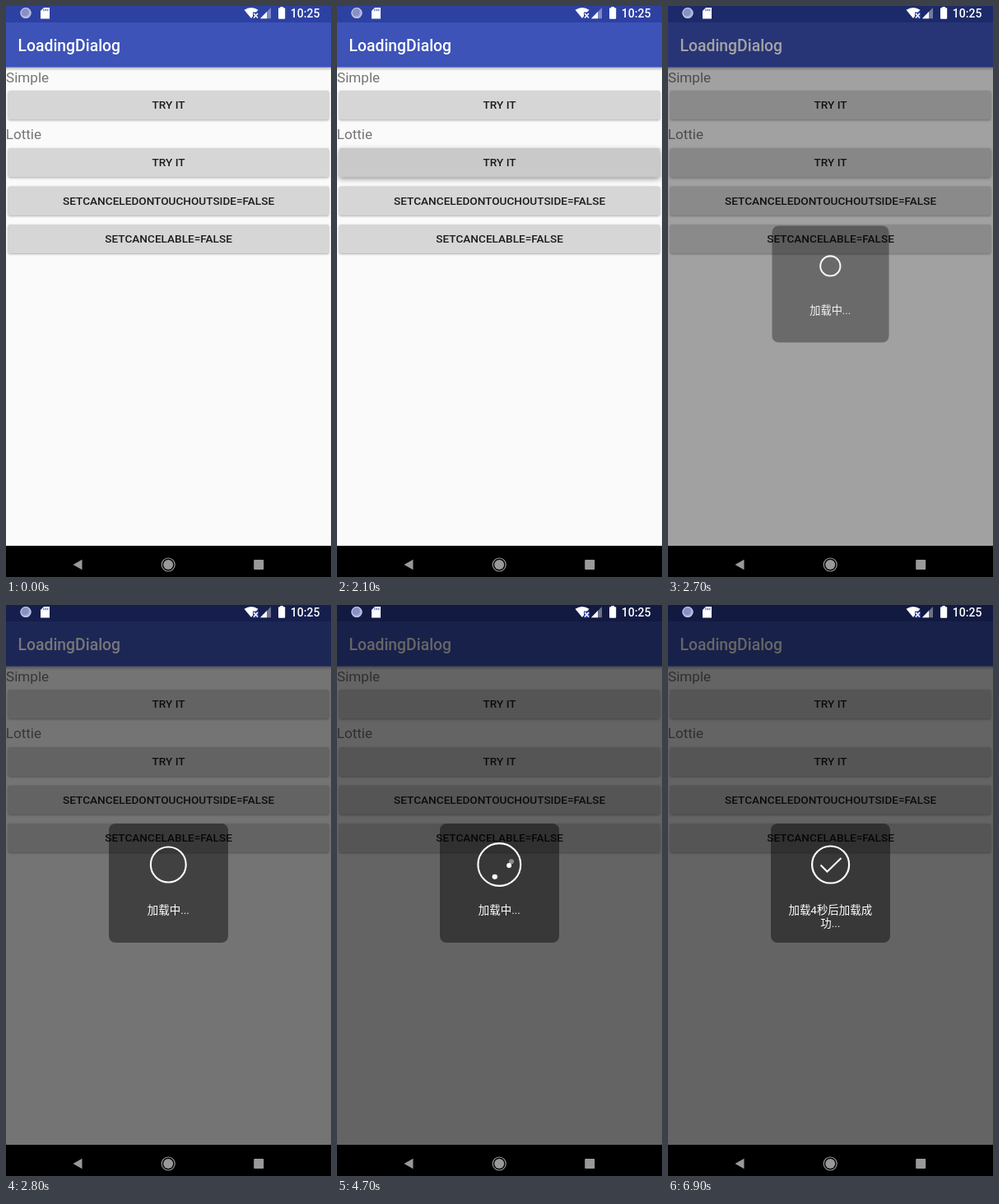
An HTML page with a canvas that plays this animation: 395 px wide and 695 px high, repeating every 8000 ms.

```html
<!DOCTYPE html>
<html lang="en">
<head>
<meta charset="utf-8">
<title>LoadingDialog</title>
<style>
html, body { margin: 0; width: 100%; height: 100%; overflow: hidden; background: #fafafa; }
canvas { display: block; }
</style>
</head>
<body>
<canvas id="stage" width="395" height="695"></canvas>
<script>
const ctx = document.getElementById('stage').getContext('2d');
const LOOP = 8000, STEP = 100;
const PRESS = 1600, OPEN = 2600, DONE = 6100;
const MID = 197.3, RING_Y = 316;
const SANS = 'Roboto, "Noto Sans CJK SC", "Noto Sans CJK", sans-serif';

const ramp = (t, from, to) => Math.min(1, Math.max(0, (t - from) / (to - from)));
const easeOut = (k, power) => 1 - (1 - k) ** power;

function rect(x, y, w, h, color) {
  ctx.fillStyle = color;
  ctx.fillRect(x, y, w, h);
}

function round(x, y, w, h, r, color) {
  ctx.fillStyle = color;
  ctx.beginPath();
  ctx.roundRect(x, y, w, h, r);
  ctx.fill();
}

function poly(points, color) {
  ctx.fillStyle = color;
  ctx.beginPath();
  points.forEach(p => ctx.lineTo(p[0], p[1]));
  ctx.closePath();
  ctx.fill();
}

function disc(x, y, r, color) {
  ctx.fillStyle = color;
  ctx.beginPath();
  ctx.arc(x, y, r, 0, 7);
  ctx.fill();
}

function ring(x, y, r, width, color, part = 1) {
  ctx.strokeStyle = color;
  ctx.lineWidth = width;
  ctx.beginPath();
  ctx.arc(x, y, r, -Math.PI / 2, -Math.PI / 2 + Math.PI * 2 * part);
  ctx.stroke();
}

function text(str, x, y, size, weight, color, align = 'left') {
  ctx.font = `${weight} ${size}px ${SANS}`;
  ctx.textAlign = align;
  ctx.fillStyle = color;
  ctx.fillText(str, x, y);
}

function button(label, y, press = 0) {
  const shade = 214 - 13 * press;
  ctx.save();
  ctx.shadowColor = `rgba(0,0,0,${0.32 + 0.08 * press})`;
  ctx.shadowBlur = 2.5 + 4 * press;
  ctx.shadowOffsetY = 1 + 1.2 * press;
  round(2.6, y, 389.8, 35.2, 2, `rgb(${shade},${shade},${shade + 1})`);
  ctx.restore();
  text(label, 197.6, Math.floor(y + 22.8), 13.6, 500, 'rgba(0,0,0,.87)', 'center');
}

function screen(t) {
  rect(0, 0, 395, 657, '#fafafa');
  const glow = ctx.createLinearGradient(0, 75, 0, 79);
  glow.addColorStop(0, 'rgba(0,0,0,.24)');
  glow.addColorStop(1, 'rgba(0,0,0,0)');
  rect(0, 75, 395, 4, glow);
  rect(0, 20, 395, 54.7, '#3d53b8');
  rect(0, 0, 395, 20, '#2d41a3');
  text('LoadingDialog', 14.5, 55, 19.35, 500, '#fff');

  const press = ramp(t, PRESS - STEP, PRESS + STEP) * (1 - ramp(t, OPEN - STEP, OPEN + 2 * STEP));
  text('Simple', 0, 93, 17.1, 400, '#757575');
  button('TRY IT', 103);
  text('Lottie', -0.3, 162, 17.1, 400, '#757575');
  button('TRY IT', 173, press);
  button('SETCANCELEDONTOUCHOUTSIDE=FALSE', 219.5);
  button('SETCANCELABLE=FALSE', 265.9);
}

function statusIcons() {
  disc(24, 8.5, 6.6, '#a9b1d6');
  disc(23, 7.5, 4.8, '#8791c4');
  ring(24, 8.5, 6, 1, '#c5cae9');

  poly([[46, 2], [53, 2], [53, 15.5], [42, 15.5], [42, 6]], '#fff');
  for (let i = 0; i < 3; i++) rect(45.5 + 2.4 * i, 3.6, 1, 2.6, '#303f9f');

  ctx.fillStyle = '#fff';
  ctx.beginPath();
  ctx.moveTo(298, 15);
  ctx.lineTo(289.5, 4.8);
  ctx.quadraticCurveTo(298, -1, 306.5, 4.8);
  ctx.closePath();
  ctx.fill();
  rect(300, 7.5, 7, 8, '#2d41a3');
  ctx.strokeStyle = '#fff';
  ctx.lineWidth = 1.5;
  ctx.beginPath();
  ctx.moveTo(301, 9); ctx.lineTo(306, 14.5);
  ctx.moveTo(306, 9); ctx.lineTo(301, 14.5);
  ctx.stroke();

  poly([[322, 2], [322, 15.3], [309, 15.3]], 'rgba(255,255,255,.38)');
  poly([[317, 7.1], [317, 15.3], [309, 15.3]], '#fff');

  rect(333.3, 1, 3.6, 2, '#fff');
  round(331, 2.3, 8.2, 13.4, 1, '#fff');
  text('10:25', 345.8, 14, 14, 500, '#fff');
}

function navBar() {
  const grey = '#999', y = 680;
  rect(0, 657, 395, 38, '#000');
  poly([[81.5, y], [92.5, y - 6.3], [92.5, y + 6.3]], grey);
  disc(197.2, y, 6, grey);
  ring(197.2, y, 8, 1.2, grey);
  round(301.2, y - 6, 12, 12, 1, grey);
}

// Each ball swings through the ring's centre while its line of travel turns.
const SWING = 955, LIFE = 1960;
const BALLS = [
  { start: 3160, angle: 214, spin: 0.048, color: '#8c8c8c' },
  { start: 3380, angle: -20, spin: -0.132, color: '#8c8c8c' },
  { start: 3600, angle: 150, spin: -0.132, color: '#fff' },
  { start: 3850, angle: 22, spin: 0.105, color: '#fff' }
];

function spinner(t) {
  const grow = easeOut(ramp(t, OPEN, OPEN + 300), 1.6);
  if (grow) ring(MID, RING_Y, 25.9 * grow, 2.1, '#fff');
  for (const { start, angle, spin, color } of BALLS) {
    const age = t - start;
    if (age < 0 || age > LIFE) continue;
    const r = 20.5 * Math.cos(age / SWING * 2 * Math.PI);
    const a = (angle + spin * age) * Math.PI / 180;
    disc(MID + r * Math.cos(a), RING_Y + r * Math.sin(a), 3, color);
  }
}

function success(t) {
  ring(197.6, RING_Y, 22.5, 2.2, '#fff', ramp(t, DONE - STEP, DONE + 400));
  const tick = ramp(t, DONE + 300, DONE + 800);
  if (!tick) return;
  const short = ramp(tick, 0, 0.32), long = ramp(tick, 0.32, 1);
  ctx.lineWidth = 2;
  ctx.beginPath();
  ctx.moveTo(185.5, 316.5);
  ctx.lineTo(185.5 + 8 * short, 316.5 + 8 * short);
  if (long) ctx.lineTo(193.5 + 17 * long, 324.5 - 16.5 * long);
  ctx.stroke();
}

function dialog(t) {
  const dim = 0.6 * Math.sin(ramp(t, OPEN - 35, OPEN + 300) * Math.PI / 2);
  const show = ramp(t, OPEN, OPEN + 200);
  const scale = 0.959 + 0.041 * show;
  rect(0, 0, 395, 657, `rgba(0,0,0,${dim})`);
  ctx.save();
  ctx.translate(197.5, 338.5);
  ctx.scale(scale, scale);
  ctx.translate(-197.5, -338.5);
  round(125, 266, 145, 145, 8, `rgba(0,0,0,${0.25 + 0.19 * show})`);
  ctx.globalAlpha = 0.85 + 0.15 * show;
  const line = (str, y) => text(str, MID, y, 13.45, 400, '#fff', 'center');
  if (t < DONE) {
    line('加载中...', 376);
    spinner(t);
  } else {
    line('加载4秒后加载成', 376);
    line('功...', 392);
    success(t);
  }
  ctx.restore();
}

function draw(now) {
  const t = Math.floor((now % LOOP) / STEP) * STEP;
  ctx.clearRect(0, 0, 395, 695);
  screen(t);
  if (t >= OPEN) dialog(t);
  statusIcons();
  navBar();
}

let start;
function frame(now) {
  start ??= now;
  draw(now - start);
  requestAnimationFrame(frame);
}
draw(0);
requestAnimationFrame(frame);
</script>
</body>
</html>
```
